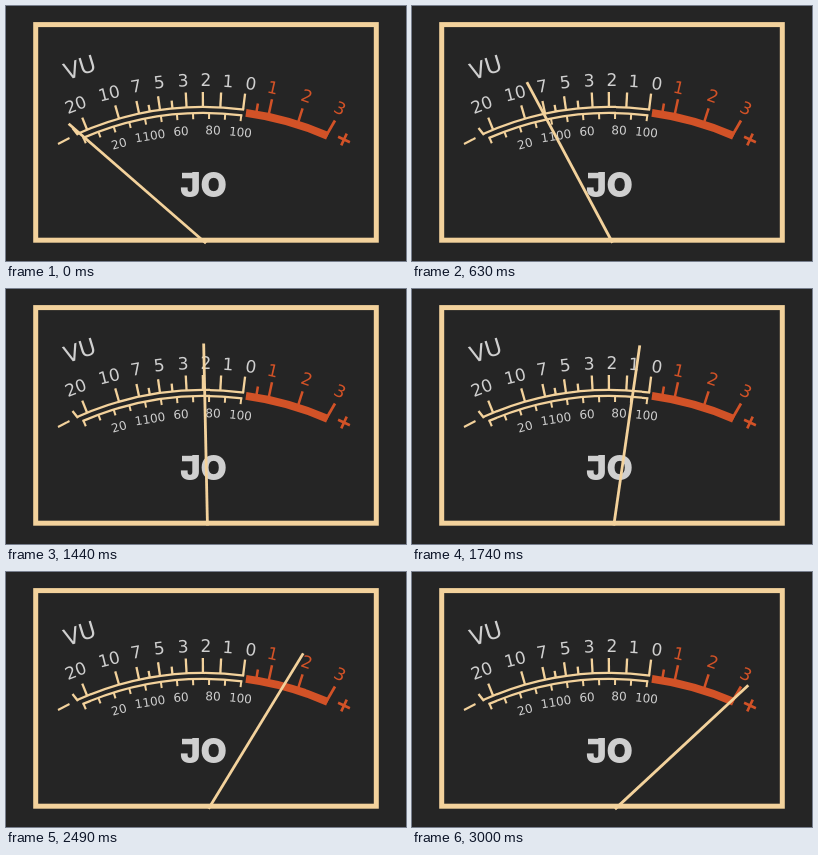
These frames come from a looping animation (400 px wide and 255 px high, 3.03 s). An HTML page:

```html
<!DOCTYPE html>
<html lang="en">
<head>
<meta charset="utf-8">
<title>VU meter</title>
<style>
  html, body { margin: 0; width: 100%; height: 100%; overflow: hidden; background: #252525; }
  svg { display: block; width: 400px; height: 255px; }
  text { font-family: "DejaVu Sans", sans-serif; text-anchor: middle; }
  .logo { font: 900 34px Inter, sans-serif; }
</style>
</head>
<body>
<svg id="stage" viewBox="0 0 400 255"></svg>
<script>
const CREAM = '#f3d29c', RED = '#d25227', GREY = '#cfcfcf';
const stage = document.getElementById('stage');
const dial = { x: 198, y: 413, outer: 312, inner: 306, band: 309 };
const pivot = { x: 201.5, y: 238.5 };
const LOOP = 3030, STEP = 30;

function add(tag, attrs, content = '') {
  const node = document.createElementNS('http://www.w3.org/2000/svg', tag);
  for (const key in attrs) node.setAttribute(key, attrs[key]);
  node.textContent = content;
  return stage.appendChild(node);
}

// Degrees are measured clockwise from straight up.
function polar(center, radius, degrees) {
  const a = degrees * Math.PI / 180;
  return [center.x + radius * Math.sin(a), center.y - radius * Math.cos(a)];
}

function line(x1, y1, x2, y2, stroke, width) {
  return add('line', { x1, y1, x2, y2, stroke, 'stroke-width': width });
}

function arc(radius, from, to, stroke, width) {
  const d = `M${polar(dial, radius, from)}A${radius} ${radius} 0 0 1 ${polar(dial, radius, to)}`;
  add('path', { d, fill: 'none', stroke, 'stroke-width': width });
}

function tick(degrees, from, to, stroke, width = 2.3) {
  line(...polar(dial, from, degrees), ...polar(dial, to, degrees), stroke, width);
}

function label(content, x, y, turn, size, fill) {
  add('text', {
    y: size * 0.365, fill, 'font-size': size,
    transform: `translate(${x} ${y}) rotate(${turn})`
  }, content);
}

function drawDial() {
  add('rect', { width: 400, height: 255, fill: '#252525' });
  add('rect', { x: 29.7, y: 18.6, width: 340.6, height: 215.6, fill: 'none', stroke: CREAM, 'stroke-width': 5 });

  arc(dial.outer, -24, 7.4, CREAM, 2.3);
  arc(dial.inner, -23.4, 7.2, CREAM, 2.3);
  arc(dial.band, 7.8, 23.6, RED, 8);

  const { outer, inner } = dial;
  [[-22, 13], [-15.8, 14], [-12, 13], [-10, 7], [-8.1, 14], [-5.8, 8],
   [-3.2, 15], [-0.2, 15], [3, 15], [7.2, 16]]
    .forEach(([angle, length]) => tick(angle, outer, outer + length, CREAM));
  [[9.7, 8], [12, 15], [17.6, 14]]
    .forEach(([angle, length]) => tick(angle, outer, outer + length, RED, 2.5));
  line(320, 130, 329, 114.5, RED, 2.7);
  line(66.5, 122, 72, 129, CREAM, 2.3);
  for (let i = 0; i <= 10; i++) tick(-23.2 + i * 3.02, inner, inner - 6, CREAM, 2);

  line(52, 138, 63.5, 132, CREAM, 2);
  const plus = add('path', { d: 'M-6.5 0H6.5M0-6.5V6.5', stroke: RED, 'stroke-width': 2.6 });
  plus.setAttribute('transform', 'translate(338 133.5) rotate(25)');

  label('V', 65.5, 64, -17, 23, GREY);
  label('U', 81, 58.5, -17, 23, GREY);
  [['20', 69.5, 98.5, -21], ['10', 103, 87, -14], ['7', 130, 80, -10], ['5', 153, 76, -7],
   ['3', 177, 74.3, -3], ['2', 200, 73.7, 0], ['1', 222, 75, 4], ['0', 245, 77.3, 8]]
    .forEach(([s, x, y, turn]) => label(s, x, y, turn, 17, GREY));
  [['1', 267, 81.5, 13], ['2', 301, 90, 19], ['3', 334, 102, 26]]
    .forEach(([s, x, y, turn]) => label(s, x, y, turn, 17, RED));
  [['20', 113, 137.5, -16], ['1100', 144, 129.7, -9], ['60', 175, 125, -4],
   ['80', 207, 124, 1], ['100', 234.5, 126, 6]]
    .forEach(([s, x, y, turn]) => label(s, x, y, turn, 12, GREY));

  add('rect', { x: 176, y: 166.8, width: 11, height: 5.5, fill: GREY });
  add('text', { class: 'logo', x: 197.5, y: 191.2, fill: GREY }, 'JO');
}

function needleAngle(t) {
  return t < 1500 ? -49 + 49.8 * t / 1500 : 0.8 + 46.3 * (t - 1500) / 1500;
}

drawDial();
const needle = line(pivot.x, pivot.y - 2, pivot.x, pivot.y - 184, CREAM, 2.8);

function render(time) {
  const t = Math.floor((time % LOOP) / STEP) * STEP;
  needle.setAttribute('transform', `rotate(${needleAngle(t)} ${pivot.x} ${pivot.y})`);
}

render(0);
let start;
requestAnimationFrame(function frame(now) {
  start ??= now;
  render(now - start);
  requestAnimationFrame(frame);
});
</script>
</body>
</html>
```
